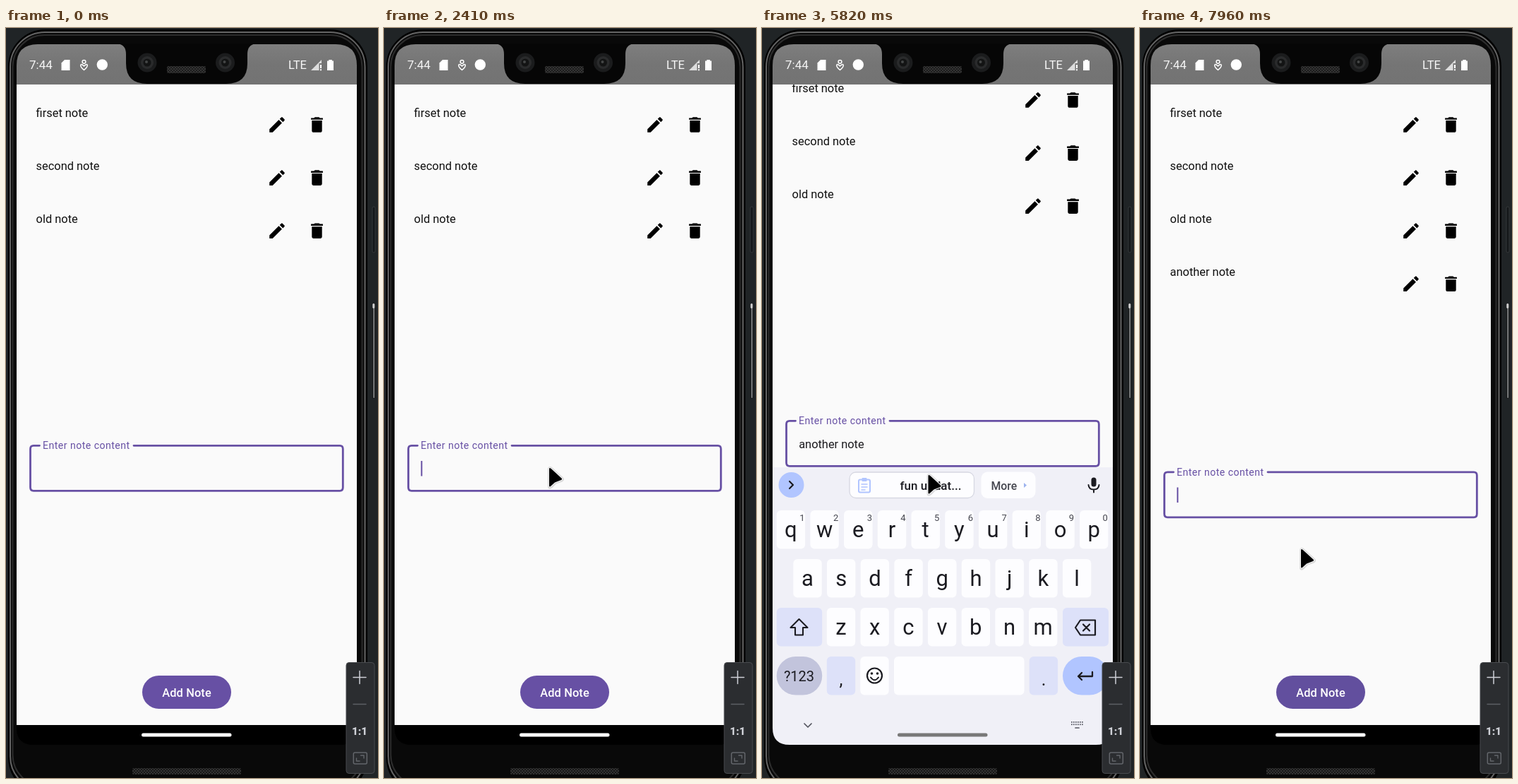
An HTML page for the animation above (8 s loop, 527 px wide and 1062 px high).

```html
<!DOCTYPE html>
<html lang="en">
<head>
<meta charset="utf-8">
<title>Notes app</title>
<style>
html, body { margin: 0; width: 100%; height: 100%; overflow: hidden; background: #202426; }
svg { display: block; width: 100%; height: 100%; font: 16.4px Roboto, sans-serif; }
text { white-space: pre; }
.line { fill: none; stroke-linecap: round; stroke-linejoin: round; }
.mid { text-anchor: middle; }
</style>
</head>
<body>
<svg id="stage" viewBox="0 0 527 1062" xmlns="http://www.w3.org/2000/svg"></svg>
<script>
const LOOP = 8000, ACCENT = '#6750a4', INK = '#1b1b21', SOFT = '#dde1f9', BLUE = '#b1c5ff';
const ADDED = 7560, OPEN = 2780, CLOSE = 6060, KEYBOARD_H = 395;
const stage = document.getElementById('stage');

const box = (x, y, w, h, r, fill, more = '') =>
  `<rect x="${x}" y="${y}" width="${w}" height="${h}" rx="${r}" fill="${fill}" ${more}/>`;
const disc = (x, y, r, fill, more = '') => `<circle cx="${x}" cy="${y}" r="${r}" fill="${fill}" ${more}/>`;
const line = (d, color, width = 2, more = '') =>
  `<path class="line" d="${d}" stroke="${color}" stroke-width="${width}" ${more}/>`;
const label = (x, y, text, fill, more = '') => `<text x="${x}" y="${y}" fill="${fill}" ${more}>${text}</text>`;
const at = (x, y, scale, body) => `<g transform="translate(${x} ${y}) scale(${scale}) translate(-12 -12)">${body}</g>`;

function phone() {
  return box(0, 0, 527, 1062, 0, '#202426') +
    box(519, 253, 4, 65, 2, '#15181a', 'stroke="#34383a"') +
    box(519, 390, 4, 135, 2, '#151718') + box(520.3, 391, 1.8, 133, 1, '#858888') +
    box(519.3, 390, 3, 7, 1.5, '#d0d0d0') +
    box(4, 3, 507, 1082, 52, '#080808', 'stroke="#000" stroke-width="2"') +
    box(6, 6, 502.5, 1074, 49, 'none', 'stroke="#646464" stroke-width="2"') +
    box(9.5, 10, 495, 1064, 45, '#090909', 'stroke="#2c2c2c" stroke-width="2"') +
    box(179, 1048, 154, 9, 2, '#171717') +
    box(179, 1048, 154, 9, 2, 'url(#mesh)');
}

function statusBar() {
  const camera = x => disc(x, 49, 13.5, '#1b1c1d') + disc(x, 49, 9, '#2a2b2c') +
    disc(x, 49, 5.5, '#131414') + disc(x - 1, 48, 2, '#444646');
  return '<path d="M15 80V53Q15 23 45 23H467Q497 23 497 53V80Z" fill="url(#status)"/>' +
    '<path d="M159 22.5Q170 24 170 37V50Q170 79 200 79H312Q342 79 342 50V37Q342 24 353 22.5Z" fill="#060606"/>' +
    camera(200) + camera(310.5) + box(228, 54, 55, 10, 2, '#1c1c1c') + box(228, 54, 55, 10, 2, 'url(#mesh)') +
    label(33, 58, '7:44', '#f6f6f6', 'font-size="17"') +
    '<path d="M83 45H90.5V60H78.5V49.5Z" fill="#fff"/>' +
    disc(110.5, 47.8, 2.4, 'none', 'stroke="#fff" stroke-width="1.5"') +
    line('M110.5 54Q106 49.5 105.7 53Q106 56 110.5 59.5Q115 56 115.3 53Q115 49.5 110.5 54Z', '#fff', 1.5) +
    disc(136.3, 52, 7.7, '#fff') +
    label(400, 58, 'LTE', '#f6f6f6', 'font-size="16.5"') +
    '<path d="M432 60L447 45V50H443.5V60Z" fill="#ddd"/><path d="M445 52h2v5h-2zM445 58.2h2v2h-2z" fill="#fff"/>' +
    '<path d="M457.3 45H461.8V46.5H464V60H455V46.5H457.3Z" fill="#fff"/>';
}

const PENCIL = '<path d="M3 17.25V21h3.75L17.81 9.94l-3.75-3.75zM20.71 7.04c.39-.39.39-1.02 0-1.41l-2.34-2.34c-.39-.39-1.02-.39-1.41 0l-1.83 1.83 3.75 3.75z"/>';
const BIN = '<path d="M6 19c0 1.1.9 2 2 2h8c1.1 0 2-.9 2-2V7H6zM19 4h-3.5l-1-1h-5l-1 1H5v2h14z"/>';

function page() {
  const row = (text, i) => `<g id="row${i}" transform="translate(0 ${i * 75.1})">` +
    label(42.6, 126, text, '#111') + at(384, 137, 1.2, PENCIL) + at(440.5, 137, 1.2, BIN) + '</g>';
  return box(15, 80, 482, 907, 0, '#fafafa') + '<g id="content">' +
    ['firset note', 'second note', 'old note', 'another note'].map(row).join('') +
    '<g id="field">' +
    line('M47.5 591.3H39Q34.5 591.3 34.5 596V650.5Q34.5 655.3 39 655.3H473Q477.3 655.3 477.3 650.5V596Q477.3 591.3 473 591.3H181', ACCENT, 2.8) +
    label(52, 596, 'Enter note content', ACCENT, 'font-size="14.08" letter-spacing=".47"') +
    label(52.2, 629.5, '', '#1c1b1f', 'id="typed"') + box(52.3, 613, 2, 21.5, 0, ACCENT, 'id="caret"') + '</g>' +
    box(193, 917, 126, 47, 23.5, ACCENT, 'id="button"') +
    label(256, 946.5, 'Add Note', '#fff', 'class="mid" font-weight="500" letter-spacing=".12"') + '</g>' +
    box(15, 987, 482, 28, 0, '#000');
}

function keyboard() {
  const pitch = 47.7;
  const key = (x, y, w, fill, r = 6) => box(x, y, w, 54.5, r, fill);
  const letters = (text, x, y, digits) => [...text].map((c, i) => {
    const cx = x + pitch * i;
    return key(cx - 20.2, y, 40.4, '#fdfdff') + label(cx, y + 37.5, c, INK, 'class="mid" font-size="31"') +
      (digits ? label(cx + 16, y + 14.5, (i + 1) % 10, '#45464f', 'class="mid" font-size="13"') : '');
  }).join('');
  const smile = disc(159.5, 917, 10.5, 'none', `stroke="${INK}" stroke-width="2.2"`) +
    disc(155.5, 914, 1.8, INK) + disc(163.5, 914, 1.8, INK) + line('M154 919.5Q159.5 927 165 919.5', INK);
  const clipboard = box(137, 639.5, 16, 18, 2, 'none', `stroke="${BLUE}" stroke-width="2"`) +
    box(141.5, 637, 7, 5, 1, BLUE) + line('M141 646H149M141 650H149M141 654H146', BLUE, 1.5);
  const mic = box(466.5, 636.5, 7, 13, 3.5, INK) + line('M462.5 647Q463 653.5 470 653.5Q477 653.5 477.5 647M470 654V657.5', INK, 2);
  const dots = Array.from({ length: 12 }, (_, i) =>
    box(438 + i % 6 * 3, 982 + Math.floor(i / 6) * 3.4, 1.7, 1.7, 0, '#555660')).join('');
  return '<g id="keyboard">' + box(15, 622, 482, 394, 0, '#f0f0f7') +
    disc(41.5, 647, 18, BLUE) + line('M39 642L44 647L39 652', INK, 2.2) +
    '<g id="chip">' + box(124, 629, 176.5, 36.5, 9, '#fdfdff', 'stroke="#d7d8e2" stroke-width="1.3"') + clipboard +
    label(195.5, 654, 'fun updat...', INK, 'font-weight="500" font-size="17"') + '</g>' +
    '<g id="more">' + box(310.5, 628.5, 77, 37.5, 9, '#fdfdff') +
    label(324.5, 653.5, 'More', '#45464f', 'font-weight="500" font-size="15.8"') +
    '<path d="M371 644L375 647.5L371 651Z" fill="#9db3ee"/></g>' + mic +
    letters('qwertyuiop', 40.9, 683, true) + letters('asdfghjkl', 64.5, 752) + letters('zxcvbnm', 112, 821) +
    key(20.7, 821, 64.5, SOFT) +
    line('M52.5 837L64.5 849H58V859.5H47V849H40.5Z', INK, 2.1) +
    key(426, 821, 65, SOFT) +
    line('M451 838.5H472V859.5H451L444 849ZM455 844.5L464 853.5M464 844.5L455 853.5', INK, 2.2) +
    key(20.7, 890, 64.5, '#c2c4dc', 27) + label(52.5, 925, '?123', INK, 'class="mid" font-size="20"') +
    key(91.8, 890, 40.4, SOFT) + label(112, 931, ',', INK, 'class="mid" font-size="25"') +
    key(139.3, 890, 40.4, '#fdfdff') + smile + key(187, 890, 184.5, '#fdfdff') +
    key(378.7, 890, 40.4, SOFT) + label(399, 931, '.', INK, 'class="mid" font-size="25"') +
    key(426, 890, 65, BLUE, 27) + line('M468 912V918H448M453 913L448 918L453 923', INK, 2.3) +
    line('M60 985L65 990L70 985', '#555660', 1.7) + dots + line('M444 991H449', '#555660', 1.7) + '</g>';
}

function toolbar() {
  return box(482, 898.5, 40, 157, 4, '#2b2d30', 'stroke="#494b4f" stroke-width="1"') +
    line('M492 919.5H510M501 910.5V928.5', '#ced0d6', 1.5) + line('M492 957.5H510', '#5d6065', 1.5) +
    label(501, 1001.3, '1:1', '#ced0d6', 'class="mid" font-size="15" font-weight="800"') +
    box(492.3, 1026, 19, 16, 2, 'none', 'stroke="#63666b" stroke-width="1.5"') +
    line('M502.5 1030H507V1034M501 1038H496.5V1034', '#63666b', 1.4);
}

stage.innerHTML = `<defs>
  <clipPath id="screen"><path d="M15 80H497V991Q497 1015 473 1015H39Q15 1015 15 991Z"/></clipPath>
  <linearGradient id="status" x2="0" y2="1"><stop stop-color="#7e7e7e"/><stop offset=".5" stop-color="#757575"/><stop offset="1" stop-color="#737373"/></linearGradient>
  <pattern id="mesh" width="4" height="4" patternUnits="userSpaceOnUse"><path d="M0 4L4 0M0 0L4 4" stroke="#3a3a3a" stroke-width=".8"/></pattern>
</defs>` + phone() + '<g clip-path="url(#screen)">' + page() + keyboard() +
  box(192, 998.5, 127.5, 5, 2.5, '#fff', 'id="bar"') + '</g>' + statusBar() + toolbar() +
  `<g id="pointer"><path d="M2 2.5V27Q2 30 5 27.5L11 21.5L20 18.5Q22 17 20 15.5L4.5 1.5Q2 0 2 2.5Z"
    fill="none" stroke="#0002" stroke-width="4" stroke-linejoin="round"/>
    <path d="M2 2.5V26Q2 28.5 4.5 26.5L10 21.5L19 18Q21 17 19.5 15.5L4.5 1.8Q2 0 2 2.5Z"
    fill="#000" stroke="#f4f4f4" stroke-width="2.2" paint-order="stroke" stroke-linejoin="round"/></g>`;

const el = Object.fromEntries([...stage.querySelectorAll('[id]')].map(e => [e.id, e]));
const clamp = v => Math.min(1, Math.max(0, v));
const move = (e, x, y) => e.setAttribute('transform', `translate(${x} ${y})`);
const show = (e, on) => e.setAttribute('visibility', on ? 'visible' : 'hidden');

const TEXT = 'another note';
const KEY_TIMES = [3530, 3770, 3910, 4080, 4250, 4350, 4460, 4570, 4910, 5050, 5110, 5180];
const PATH = [
  [420, 410, 925], [510, 362, 830], [590, 322, 735], [670, 293, 665], [760, 296, 600], [830, 307, 515],
  [950, 323, 415], [1010, 342, 345], [1090, 365, 297], [1200, 308, 356], [1290, 250, 500], [1370, 222, 585],
  [1460, 211, 651], [1700, 211, 651], [1910, 218, 617], [2170, 218, 617], [2200, 232, 622], [2780, 232, 622],
  [2830, 233.5, 632], [6060, 233.5, 632], [6430, 212, 708], [6600, 210, 780], [6750, 215, 840],
  [6840, 235, 895], [7000, 243, 925], [7650, 243, 925], [7800, 247, 840], [7880, 234, 765], [7960, 226, 737]
];

function pointerAt(t) {
  const i = PATH.findIndex(p => p[0] > t);
  if (i < 0) return PATH[PATH.length - 1].slice(1);
  const [t0, x0, y0] = PATH[i - 1], [t1, x1, y1] = PATH[i], u = (t - t0) / (t1 - t0);
  return [x0 + (x1 - x0) * u, y0 + (y1 - y0) * u];
}

function caretVisible(t) {
  if (t < OPEN) return Math.floor((t + 90) / 500) % 2 === 1;
  if (t < KEY_TIMES[0]) return t < 3330;
  if (t < 5720 || t >= ADDED) return true;
  return Math.floor((t - 5720) / 500) % 2 === 1;
}

// 0 is closed, 1 is fully open
function opened(t, tau) {
  if (t < OPEN) return 0;
  if (t < CLOSE) return t > 3180 ? 1 : 1 - Math.exp((2690 - t) / tau);
  return 1 - clamp((t - CLOSE + 20) / 260) ** 2;
}

function grow(e, cx, t, missing) {
  const s = 1 - missing * Math.min(1.6, Math.exp((2840 - t) / 70));
  e.setAttribute('transform', `translate(${cx} 647) scale(${s}) translate(${-cx} -647)`);
  e.setAttribute('opacity', clamp(1 - (1 - s) * 1.1));
}

function draw(t) {
  const added = t >= ADDED, up = opened(t, 68);
  move(el.content, 0, -35 * opened(t, 48));
  move(el.field, 0, added ? 37.5 : 0);
  show(el.row3, added);

  const text = added ? '' : TEXT.slice(0, KEY_TIMES.filter(k => k <= t).length);
  if (el.typed.textContent !== text) el.typed.textContent = text;
  move(el.caret, text ? el.typed.getComputedTextLength() : 0, 0);
  show(el.caret, caretVisible(t));

  show(el.keyboard, up > 0);
  move(el.keyboard, 0, KEYBOARD_H * (1 - up));
  grow(el.chip, 212.3, t, .11);
  grow(el.more, 349, t, .44);

  const dim = clamp((t - 3530) / 80) - clamp((t - 7600) / 200);
  const shade = Math.round(255 - 135 * dim);
  el.bar.setAttribute('fill', `rgb(${shade},${shade},${shade})`);
  el.button.setAttribute('fill', t > 7500 ? '#624f9e' : ACCENT);

  show(el.pointer, t >= PATH[0][0]);
  if (t >= PATH[0][0]) move(el.pointer, ...pointerAt(t));
}

const start = performance.now();
function tick() {
  draw((performance.now() - start) % LOOP);
  requestAnimationFrame(tick);
}
tick();
</script>
</body>
</html>
```
